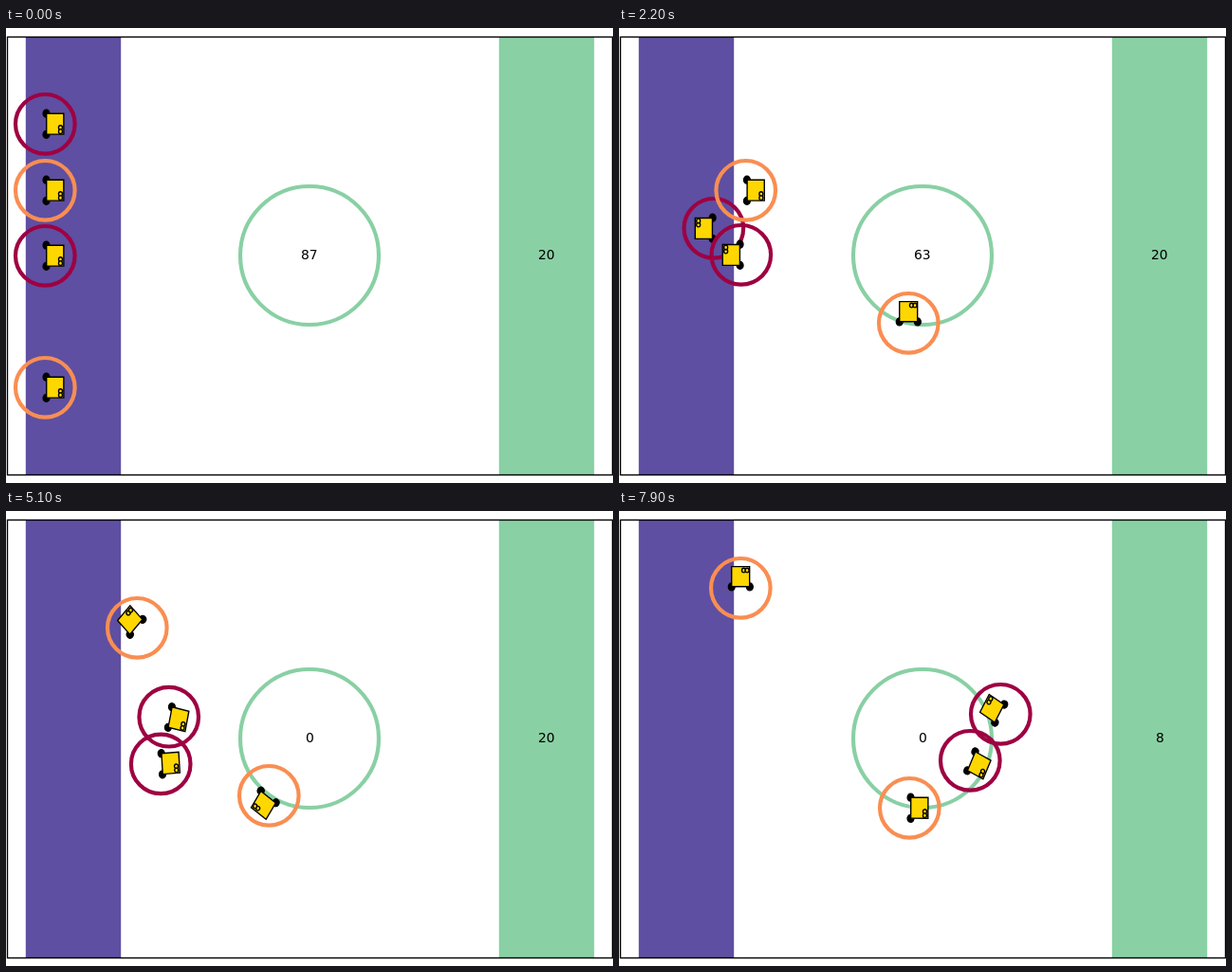
An HTML page with a canvas that plays this animation: 640x480 px, repeating every 8000 ms.

```html
<!DOCTYPE html>
<html lang="en">
<head>
<meta charset="utf-8">
<style>
  html, body { margin: 0; width: 640px; height: 480px; overflow: hidden; background: #fff; }
  canvas { display: block; }
</style>
</head>
<body>
<canvas id="stage" width="640" height="480"></canvas>
<script>
const ctx = document.getElementById('stage').getContext('2d');
const LOOP = 8000, STEP = 100, SX = 199.5, SY = 231; // pixels per metre
const RED = '#9e0142', ORANGE = '#f98e52', GREEN = '#89d0a4', PURPLE = '#5e4fa2';
const STAGE_ENDS = [0, 1300, 3200, 4400, 5800, 6600, 7900];

// Robots drive straight between corners and turn on the spot.
// Stages are split by "|"; the last corner of each is reached at its STAGE_ENDS time.
const robots = [
  { color: RED, speed: 1.3, route: `41,101 | 292,101 292,173 | 292,211 80,211 290,211
    | 314,211 96,208 86,197 | 65,190 231,232 215,247 232,230 | 240,224 429,225
    | 555,222 418,225 402,214` },
  { color: ORANGE, speed: .23, route: `41,171 | 91,171 | 141,171 141,130
    | 141,127 108,130 113,125 | 138,123 120,123 120,113 | 117,101 138,102
    | 148,102 128,102 128,81` },
  { color: RED, speed: 1.3, route: `41,240 | 225,234 234,235 | 275,239 73,239 230,239
    | 292,240 118,241 110,247 | 70,274 283,257 266,274 | 257,282 120,251 91,260
    | 84,262 352,253 370,263` },
  { color: ORANGE, speed: .76, route: `41,379 | 238,379 | 305,379 305,305 169,305
    | 110,305 155,306 191,299 | 277,300 179,302 | 98,314 108,312 | 306,313` }
];
for (const r of robots) r.keys = timeline(r);

const centreLoads = [[0, 87], [1300, 75], [1500, 63], [2300, 41], [3300, 17], [5000, 0]];
const rightLoads = [[0, 20], [7300, 8]];

// A degree of turning costs one millisecond; each stage is scaled to its length.
function timeline({ route, speed }) {
  const stages = route.split('|').map(s => s.trim().split(/\s+/).map(p => p.split(',').map(Number)));
  let [[[x, y]]] = stages, deg = 0;
  const keys = [{ t: 0, x, y, deg }];
  stages.slice(1).forEach((corners, i) => {
    const moves = [];
    for (const [nx, ny] of corners) {
      const dx = (nx - x) / SX, dy = (ny - y) / SY;
      const aim = Math.atan2(dy, dx) * 180 / Math.PI;
      const turn = ((aim - deg + 180) % 360 + 360) % 360 - 180;
      deg += turn;
      moves.push({ x, y, deg, cost: Math.abs(turn) });
      [x, y] = [nx, ny];
      moves.push({ x, y, deg, cost: Math.hypot(dx, dy) / speed * 1000 });
    }
    const total = moves.reduce((sum, m) => sum + m.cost, 0);
    let t = STAGE_ENDS[i];
    for (const m of moves) {
      t += m.cost / total * (STAGE_ENDS[i + 1] - STAGE_ENDS[i]);
      keys.push({ ...m, t });
    }
  });
  return keys;
}

function poseAt(keys, t) {
  const i = keys.findIndex(k => k.t > t);
  if (i < 0) return keys[keys.length - 1];
  const a = keys[i - 1], b = keys[i], f = (t - a.t) / (b.t - a.t);
  const mix = name => a[name] + (b[name] - a[name]) * f;
  return { x: mix('x'), y: mix('y'), deg: mix('deg') };
}

const countAt = (loads, t) => loads.filter(l => l[0] <= t).pop()[1];

function ring(x, y, r, color) {
  ctx.beginPath();
  ctx.arc(x, y, r, 0, 7);
  ctx.strokeStyle = color;
  ctx.lineWidth = 4.17;
  ctx.stroke();
}

function drawRobot({ x, y, deg }, color) {
  x += .3;
  y += .3;
  ring(x, y, 31.3, color);

  // Shapes are in metres; outlines keep their pixel width.
  function shape(trace, fill) {
    ctx.save();
    ctx.translate(x, y);
    ctx.scale(SX, SY);
    ctx.rotate(deg * Math.PI / 180);
    ctx.beginPath();
    trace();
    ctx.restore();
    ctx.fillStyle = fill;
    ctx.fill();
    ctx.strokeStyle = '#000';
    ctx.lineWidth = 1.39;
    ctx.stroke();
  }
  const disc = (dx, dy, r, fill) => shape(() => ctx.arc(dx, dy, r, 0, 7), fill);

  disc(.006, -.048, .017, '#000');
  disc(.006, .048, .017, '#000');
  shape(() => ctx.rect(.007, -.048, .091, .095), '#ffd700');
  disc(.081, .016, .01, '#ffd700');
  disc(.081, .034, .01, '#ffd700');
}

function label(n, x) {
  ctx.font = '13.89px "DejaVu Sans", sans-serif';
  ctx.fillStyle = '#000';
  ctx.fillText(n, Math.round(x - ctx.measureText(n).width / 2), 244);
}

function draw(t) {
  ctx.fillStyle = '#fff';
  ctx.fillRect(0, 0, 640, 480);
  ctx.fillStyle = PURPLE;
  ctx.fillRect(20.8, 9.5, 100.4, 462);
  ctx.fillStyle = GREEN;
  ctx.fillRect(519.8, 9.5, 100.4, 462);
  ring(320, 240, 73, GREEN);
  ctx.strokeStyle = '#000';
  ctx.lineWidth = 1.39;
  ctx.strokeRect(1.5, 9.5, 638, 462);

  for (const r of robots) drawRobot(poseAt(r.keys, t), r.color);

  label(countAt(centreLoads, t), 320);
  label(countAt(rightLoads, t), 570);
}

const start = performance.now();
function tick() {
  const t = Math.max(0, performance.now() - start) % LOOP;
  draw(Math.floor(t / STEP) * STEP);
  requestAnimationFrame(tick);
}
tick();
</script>
</body>
</html>
```
